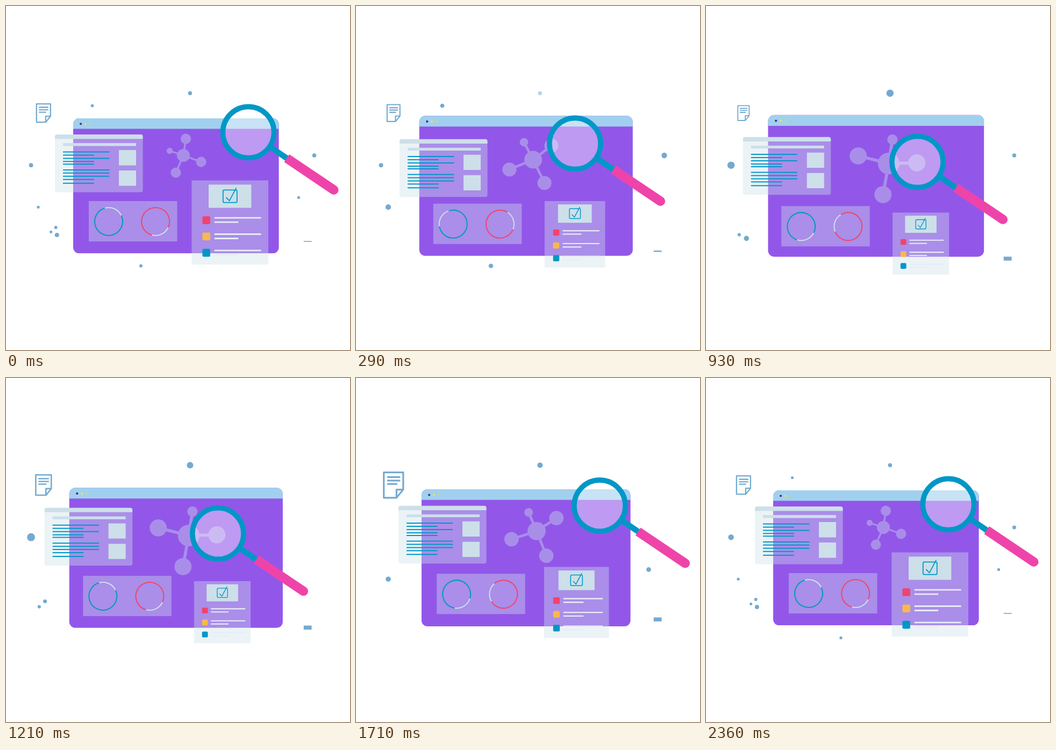
An HTML page that plays this animation: 640 px wide and 640 px high, repeating every 2430 ms.

```html
<!DOCTYPE html>
<html lang="en">
<head>
<meta charset="utf-8">
<title>Data search</title>
<style>
  html, body { margin: 0; width: 100%; height: 100%; overflow: hidden; background: #fff; }
  svg { display: block; width: 100vw; height: 100vh; }
  .pale { fill: #cddfe9; }
  .glass { fill: #cde1e9; opacity: .4; }
  .teal { fill: #0097c7; }
  .blue { fill: #74aad0; }
  .line { fill: none; stroke: #0097c7; }
  .ring { fill: none; stroke-width: 2; }
  .icon { fill: none; stroke: #74aad0; stroke-width: 2.3; stroke-linejoin: round; }
</style>
</head>
<body>
<svg viewBox="0 0 640 640">
  <g id="dots" class="blue"></g>
  <rect id="dash" class="blue" x="553.8" width="14.8"/>

  <g id="page" class="icon">
    <path d="M-13 -17H13V6L4 17H-13ZM13 6H4V17"/>
    <path d="M-8.5 -10.7H9M-8.5 -6H9M-8.5 -1.5H5"/>
  </g>

  <g id="win">
    <rect x="-191.3" y="-125.5" width="382.6" height="251" rx="11" fill="#9257e9"/>
    <path d="M-191.3 -106.2v-8.3a11 11 0 0 1 11 -11h360.6a11 11 0 0 1 11 11v8.3Z" fill="#a1d0ee"/>
    <g id="lights"></g>
  </g>

  <g id="mol" class="glass" stroke="#cde1e9" stroke-width="3.4"></g>

  <g id="list">
    <path class="glass" d="M0 8.3H163.6v95.2a4 4 0 0 1 -4 4H4a4 4 0 0 1 -4 -4Z"/>
    <path class="pale" d="M0 8.3V4a4 4 0 0 1 4 -4H159.6a4 4 0 0 1 4 4v4.3Z"/>
    <path class="pale" d="M15 16h136v5.3h-136ZM119 29h32v28.3h-32ZM119 67h32v28.3h-32Z"/>
    <g id="rows" class="line" stroke-width="2"></g>
  </g>

  <g id="charts">
    <rect class="glass" width="164.5" height="75"/>
    <g id="ringA" class="ring"></g>
    <g id="ringB" class="ring"></g>
  </g>

  <g id="form">
    <rect class="glass" width="142.6" height="156.5"/>
    <rect class="pale" x="31.6" y="7.8" width="79.4" height="43.2"/>
    <g class="line" stroke-width="1.8">
      <rect x="58.4" y="17.8" width="26" height="23.4" rx="2.5"/>
      <path d="M64 31.5L70.2 37.8L83 13.8"/>
    </g>
    <g id="items"></g>
  </g>

  <g id="lens">
    <circle r="45" fill="#fff" opacity=".4"/>
    <g transform="rotate(34)">
      <rect class="teal" x="50" y="-5.4" width="38" height="10.8"/>
      <path d="M86 -8.6H191.8a8.6 8.6 0 0 1 0 17.2H86Z" fill="#ee44aa"/>
    </g>
    <circle class="line" r="47.6" stroke-width="9.6"/>
  </g>
</svg>
<script>
const LOOP = 2430, STEP = 500 / 7;
const TIMES = [0, 290, 570, 930, 1210, 1710, 2360];
const $ = id => document.getElementById(id);

// Periodic cubic through the given values, with limited slopes at the keys.
// A missing last value repeats the first one.
function track(list, times = TIMES) {
  const n = times.length, values = [...list, list[0]].slice(0, n);
  const wrap = i => (i + n) % n;
  const gap = i => (times[wrap(i + 1)] - times[wrap(i)] + LOOP) % LOOP;
  const rate = i => (values[wrap(i + 1)] - values[wrap(i)]) / gap(wrap(i));
  const slope = values.map((_, i) => {
    const a = rate(i - 1), b = rate(i), ga = gap(wrap(i - 1)), gb = gap(i);
    const m = (a * gb + b * ga) / (ga + gb);
    const max = 3 * Math.min(Math.abs(a), Math.abs(b));
    return Math.max(-max, Math.min(max, m));
  });
  return t => {
    let i = n - 1;
    while (i > 0 && times[i] > t) i--;
    const h = gap(i), u = (t - times[i]) / h, v = 1 - u, j = wrap(i + 1);
    return values[i] * (1 + 2 * u) * v * v + values[j] * u * u * (3 - 2 * u)
      + h * u * v * (slope[i] * v - slope[j] * u);
  };
}

// Grows from nothing, stays, then shrinks away.
function pulse(start, grow, peak, hold, drop) {
  return t => {
    const age = (t - start + LOOP) % LOOP;
    if (age < grow) return peak * (age / grow) ** .9;
    return peak * Math.min(1, 1 - (age - grow - hold) / drop);
  };
}

function add(parent, tag, attrs) {
  const el = document.createElementNS('http://www.w3.org/2000/svg', tag);
  for (const k in attrs) el.setAttribute(k, attrs[k]);
  return parent.appendChild(el);
}

// Repeated static parts
['#4b2a86', '#f3df50', '#b9dc98'].forEach((fill, i) =>
  add($('lights'), 'circle', { cx: -177.3 + i * 8.6, cy: -115.3, r: 2, fill }));

const balls = [[31.3, -81.7, 9.5], [35.1, 20, 9.5], [34.9, 113.6, 9.5], [26.9, 198.4, 5.7]];
add($('mol'), 'circle', { r: 12, stroke: 'none' });
for (const [x2, turn, r] of balls) {
  const arm = add($('mol'), 'g', { transform: `rotate(${turn})` });
  add(arm, 'line', { x2 });
  add(arm, 'circle', { cx: x2, r, stroke: 'none' });
}

[32.4, 65.8].forEach((top, group) => {
  for (let i = 0; i < 5; i++) {
    const y = top + i * 5.95 + (i > 3 ? (group ? 1 : -1) : 0);
    const long = group ? i < 3 : i % 2 === 0 && i < 4;
    add($('rows'), 'path', { d: `M15 ${y}H${long ? 101.3 : 72.8}` });
  }
});

['#f0446c', '#fab849', '#0097c7'].forEach((fill, i) => {
  const y = 66.7 + i * 30.3;
  add($('items'), 'rect', { x: 20, y, width: 14.6, height: 14.6, rx: 2.6, fill });
  add($('items'), 'path', {
    d: `M42.4 ${y + 3}H129.2M42.4 ${y + 11}H86.8`, stroke: '#e7ecf6', 'stroke-width': 2.8
  });
});

const rings = [['ringA', 37, 254, '#0099c0'], ['ringB', 124.2, 25, '#f0446c']];
for (const [id, , , color] of rings) {
  const arc = { r: 26, pathLength: 360 };
  add($(id), 'circle', { ...arc, stroke: '#cddfe9', 'stroke-dasharray': '80 280' });
  add($(id), 'circle', { ...arc, stroke: color, 'stroke-dasharray': '280 80', 'stroke-dashoffset': -80 });
}

// Floating dots
const dots = [];
function dot(cx, cy, radius) {
  const el = add($('dots'), 'circle', { cx, cy });
  dots.push({ el, radius });
  return el;
}
function cluster(x, y, size, start, delay) {
  const bubble = (dx, dy, r, i) =>
    dot(x + dx * size, y + dy * size, pulse(start + i * delay, 140, r * size, 430, 140));
  bubble(0, 0, 4.8, 0);
  bubble(-13.4, -6.9, 3.1, 1);
  bubble(-2.6, -16.9, 3.6, 2);
}

const topDot = dot(342.4, 162.2,
  track([3.7, 3.7, 3.7, 7, 6.7, 6, 5, 3.8], [0, 290, 360, 570, 930, 1210, 1710, 2360]));
const topFade = track([1, 1, .5, 0, 0, 1], [0, 140, 290, 430, 570, 640]);
dot(46.6, 296.2, track([3.9, 5.7, 7.4, 7.5, 0, 0, 7.5, 5.3], [0, 570, 1210, 1290, 1430, 2210, 2290, 2360]));
dot(60, 374.2, track([2.6, 5.1, 0, 0, 5, 4.8], [0, 290, 500, 1290, 1640, 1710, 2360]));
dot(544.5, 356.4, track([2.6, 0, 0, 4.5, 4.3], [0, 210, 1290, 1640, 1710, 2360]));
dot(160.5, 185.5, pulse(1710, 1360, 5, 0, 150));
dot(573.5, 278, pulse(1710, 1510, 7.4, 0, 280));
dot(251, 483.5, pulse(1710, 1150, 4.6, 0, 320));
cluster(75.2, 432.4, 1, 360, 290);
cluster(94.8, 426.1, .83, 1870, 60);

const win = track([1, 1.038, 1.059, 1.05, 1.038, 1.016]);
const lensX = track([451, 407.5, 394.2, 393.5, 394.4, 453.5]);
const lensY = track([235, 256, 285.4, 290, 289.4, 237.5]);
const molX = track([330, 329.6, 337.6, 339.9, 339.9, 336]);
const molY = track([278, 286, 291.6, 293, 293, 284.8]);
const molTurn = track([0, 44, 74.2, 80.4, 80.4, 48.4]);
const listX = track([91, 81, 70.6, 68.7, 71.6, 79]);
const listY = track([239.1, 247.7, 252, 243.7, 241.4, 237.7]);
const chartX = track([154, 143.8, 139.1, 140.2, 143.3, 150.2]);
const chartY = track([363, 367.8, 376.2, 372.2, 368, 364.2]);
const chartTurn = track([0, -83, -242, -227, 0, -236, -228],
  [0, 290, 570, 930, 1210, 1710, 2110, 2360]);
const formX = track([345.4, 350.9, 346.3, 347.1, 350, 349.9]);
const formY = track([324.5, 363, 387, 384.4, 378, 351.5]);
const formSize = track([1, .79, .737, .737, .737, .846]);
const pageSize = track([1, .92, .82, .81, 1.11, 1.39]);
const dashY = track([438, 456.2, 468, 470, 464.4, 449.2]);
const dashH = track([1.6, 2.5, 4.6, 7.3, 7.6, 7.4]);

function place(id, x, y, size = 1, turn = 0) {
  $(id).setAttribute('transform', `translate(${x} ${y}) rotate(${turn}) scale(${size})`);
}

function draw(t) {
  const turn = molTurn(t), h = dashH(t);
  place('win', 316.3, 334.6, win(t));
  place('lens', lensX(t), lensY(t));
  place('mol', molX(t), molY(t), 1 + turn * .0084, turn);
  place('list', listX(t), listY(t));
  place('charts', chartX(t), chartY(t));
  for (const [id, x, start] of rings) place(id, x, 38, 1, start + chartTurn(t));
  place('form', formX(t), formY(t), formSize(t));
  place('page', 69.8, 199.2, pageSize(t));

  $('dash').setAttribute('y', dashY(t) - h / 2);
  $('dash').setAttribute('height', h);
  for (const d of dots) d.el.setAttribute('r', Math.max(0, d.radius(t)));
  topDot.setAttribute('opacity', topFade(t));
}

// The picture advances 14 times a second, on whole hundredths.
function snap(t) {
  const at = k => Math.round(k * STEP / 10) * 10;
  const k = Math.floor((t + 5) / STEP);
  return Math.min(at(k) > t ? at(k - 1) : at(k), 2360);
}

const begin = performance.now();
function tick() {
  draw(snap(Math.max(0, performance.now() - begin) % LOOP));
  requestAnimationFrame(tick);
}
tick();
</script>
</body>
</html>
```
